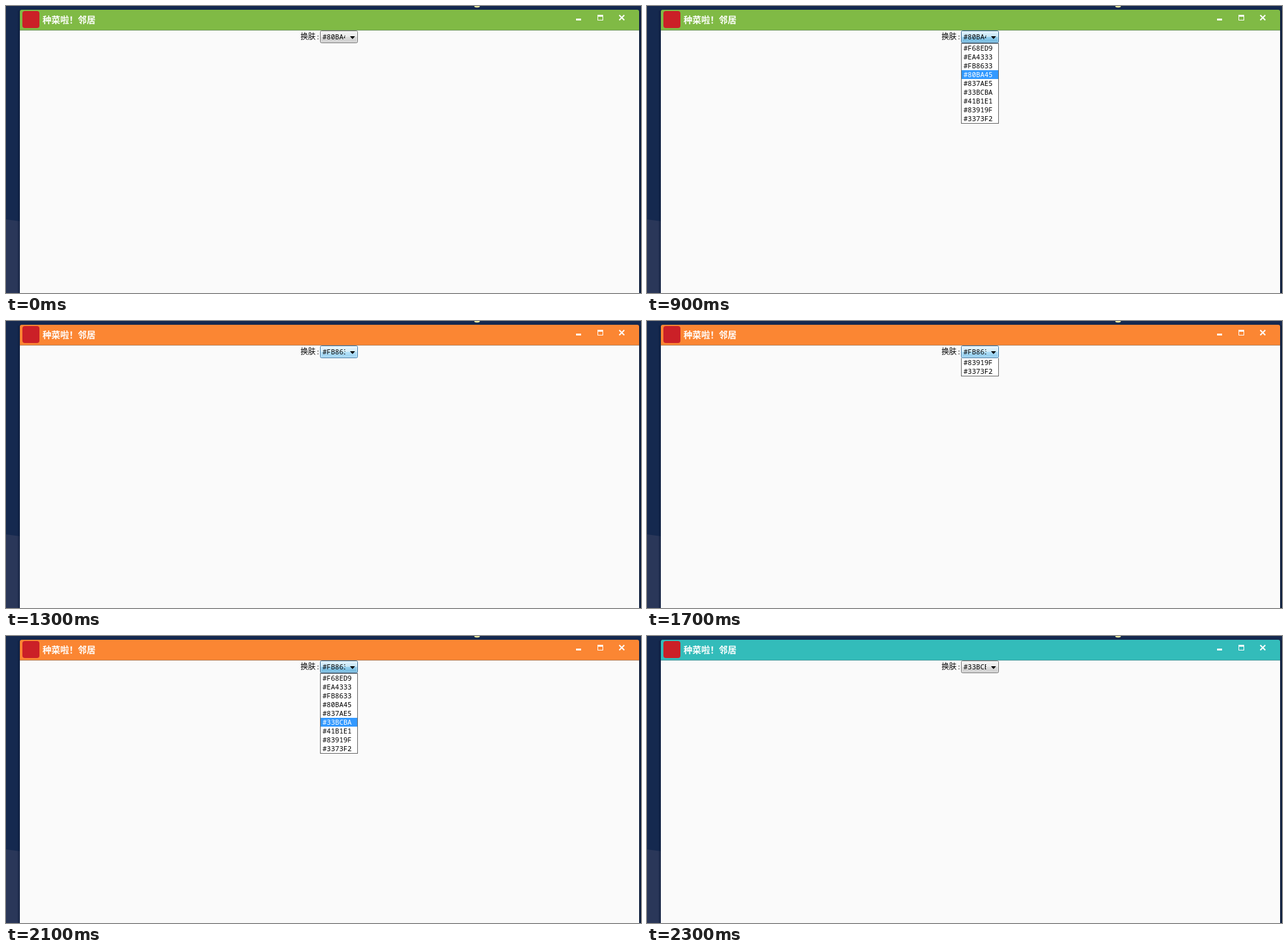
These frames come from a looping animation (1007 px wide and 456 px high, 4100 ms). An HTML page:

```html
<!DOCTYPE html>
<html lang="zh-CN">
<head>
<meta charset="utf-8">
<title>换肤</title>
<style>
  html, body { margin: 0; width: 100%; height: 100%; overflow: hidden; background: #15294f; }
  svg { display: block; width: 1007px; height: 456px; }
  text { white-space: pre; }
  .title { font: bold 14px "Noto Sans CJK SC", "Noto Sans CJK", sans-serif; fill: #fff; }
  .label { font: 12px "Noto Sans CJK SC", "Noto Sans CJK", sans-serif; fill: #000; }
  .code { font: 11px "Noto Sans Mono", "DejaVu Sans Mono", monospace; }
  .crisp { shape-rendering: crispEdges; }
</style>
</head>
<body>
<svg viewBox="0 0 1007 456" xmlns="http://www.w3.org/2000/svg">
  <defs>
    <linearGradient id="face" x1="0" y1="0" x2="0" y2="1">
      <stop offset="0"/><stop offset=".5"/><stop offset=".5"/><stop offset="1"/>
    </linearGradient>
    <linearGradient id="shade">
      <stop offset="0" stop-color="#0b1a38" stop-opacity="0"/>
      <stop offset="1" stop-color="#0b1a38" stop-opacity=".6"/>
    </linearGradient>
    <clipPath id="valueClip"><rect x="501" y="40" width="37" height="18"/></clipPath>
    <clipPath id="listClip"><rect x="498" y="59" width="60" height="128"/></clipPath>
  </defs>

  <!-- desktop -->
  <rect width="1007" height="456" fill="#15294f"/>
  <path d="M0 339L22 342V456H0Z" fill="#2a3759"/>
  <ellipse cx="747" cy="0" rx="4.5" ry="2.5" fill="#eeeaa0"/>
  <rect x="17" y="7" width="5" height="449" fill="url(#shade)"/>
  <rect x="1004" y="7" width="3" height="449" fill="#10203f"/>

  <!-- window -->
  <path id="bar" d="M22 39V9Q22 6 25 6H1001Q1004 6 1004 9V39Z"/>
  <rect class="crisp" x="22" y="38" width="982" height="1" fill="#6f8088" fill-opacity=".5"/>
  <rect class="crisp" x="22" y="39" width="982" height="417" fill="#fafafa"/>
  <rect x="26" y="8" width="27" height="27" rx="4" fill="#cb2027"/>
  <text class="title" x="58" y="27">种菜啦！邻居</text>
  <rect class="crisp" x="904" y="20" width="8" height="3" fill="#fff"/>
  <path class="crisp" d="M938 14H947V23H938ZM939 17V22H946V17Z" fill="#fff" fill-rule="evenodd"/>
  <path d="M972.5 14.5L980.5 22.5M980.5 14.5L972.5 22.5" stroke="#fff" stroke-width="2"/>

  <!-- combo box -->
  <text class="label" x="467" y="53">换肤</text>
  <text class="code" x="491.4" y="53">:</text>
  <rect id="combo" x="498.5" y="39.5" width="59" height="19" rx="2" fill="url(#face)"/>
  <rect x="499.5" y="40.5" width="57" height="17" rx="1" fill="none" stroke="#fff" stroke-opacity=".45"/>
  <g clip-path="url(#valueClip)"><text id="value" class="code" x="502" y="53"></text></g>
  <path d="M545.5 48H553.5L549.5 52.5Z"/>
  <g clip-path="url(#listClip)">
    <g id="list">
      <rect x="498.5" y="59.5" width="59" height="127" fill="#fff" stroke="#646464"/>
    </g>
  </g>
</svg>
<script>
const LOOP = 4100, ROW = 14, LIST_H = 128;
const skins = ['#F68ED9', '#EA4333', '#FB8633', '#80BA45', '#837AE5',
               '#33BCBA', '#41B1E1', '#83919F', '#3373F2'];
const GREEN = 3, ORANGE = 2, TEAL = 5;

// Button looks: idle, hover, pressed. Four gradient stops, then the border.
const looks = [
  ['f3f3f3', 'ebebeb', 'dddddd', 'cdcdcd', '707070'],
  ['eaf6fd', 'd9f0fc', 'bee6fd', 'a7d9f5', '3c7fb1'],
  ['e5f4fc', 'c4e5f6', '98d1ef', '68b3db', '2c628b']
];

// [start ms, skin, button level, open list height, highlighted row]
const steps = [
  [0, GREEN, 0, 0, -1],
  [600, GREEN, .45, 0, -1],
  [700, GREEN, 1, 0, -1],
  [800, GREEN, 1.4, 29, -1],
  [900, GREEN, 2, LIST_H, GREEN],
  [1000, GREEN, 2, LIST_H, 1],
  [1100, GREEN, 2, LIST_H, ORANGE],
  [1300, ORANGE, 1.2, 0, -1],
  [1400, ORANGE, 1, 0, -1],
  [1600, ORANGE, 1.2, 0, -1],
  [1700, ORANGE, 1.4, 29, -1],
  [1800, ORANGE, 2, LIST_H, ORANGE],
  [1900, ORANGE, 2, LIST_H, GREEN],
  [2100, ORANGE, 2, LIST_H, TEAL],
  [2200, TEAL, 1, 0, -1],
  [2300, TEAL, 0, 0, -1]
];

const $ = id => document.getElementById(id);
const bar = $('bar'), combo = $('combo'), value = $('value'), list = $('list');
const stops = [...$('face').children];

function add(tag, attrs) {
  const el = document.createElementNS('http://www.w3.org/2000/svg', tag);
  for (const k in attrs) el.setAttribute(k, attrs[k]);
  return list.appendChild(el);
}

const rows = skins.map((name, i) => {
  const y = 60 + i * ROW;
  const back = add('rect', { class: 'crisp', x: 499, y, width: 58, height: ROW, fill: '#39f' });
  const text = add('text', { class: 'code', x: 502, y: y + 11 });
  text.textContent = name;
  return { back, text };
});

function mix(a, b, k) {
  const part = (hex, i) => parseInt(hex.slice(i, i + 2), 16);
  return `rgb(${[0, 2, 4].map(i => Math.round(part(a, i) + (part(b, i) - part(a, i)) * k))})`;
}

function paintButton(level) {
  const i = Math.min(1, Math.floor(level));
  const color = n => mix(looks[i][n], looks[i + 1][n], level - i);
  stops.forEach((stop, n) => stop.setAttribute('stop-color', color(n)));
  combo.setAttribute('stroke', color(4));
}

function render(ms) {
  const t = ms % LOOP;
  const [, skin, level, open, hot] = steps.findLast(s => s[0] <= t);
  bar.setAttribute('fill', skins[skin]);
  value.textContent = skins[skin];
  paintButton(level);
  list.setAttribute('visibility', open ? 'visible' : 'hidden');
  list.setAttribute('transform', `translate(0 ${open - LIST_H})`);
  rows.forEach(({ back, text }, i) => {
    back.setAttribute('opacity', i === hot ? 1 : 0);
    text.setAttribute('fill', i === hot ? '#fff' : '#000');
  });
}

const start = performance.now();
function tick() {
  render(performance.now() - start);
  requestAnimationFrame(tick);
}
tick();
</script>
</body>
</html>
```
